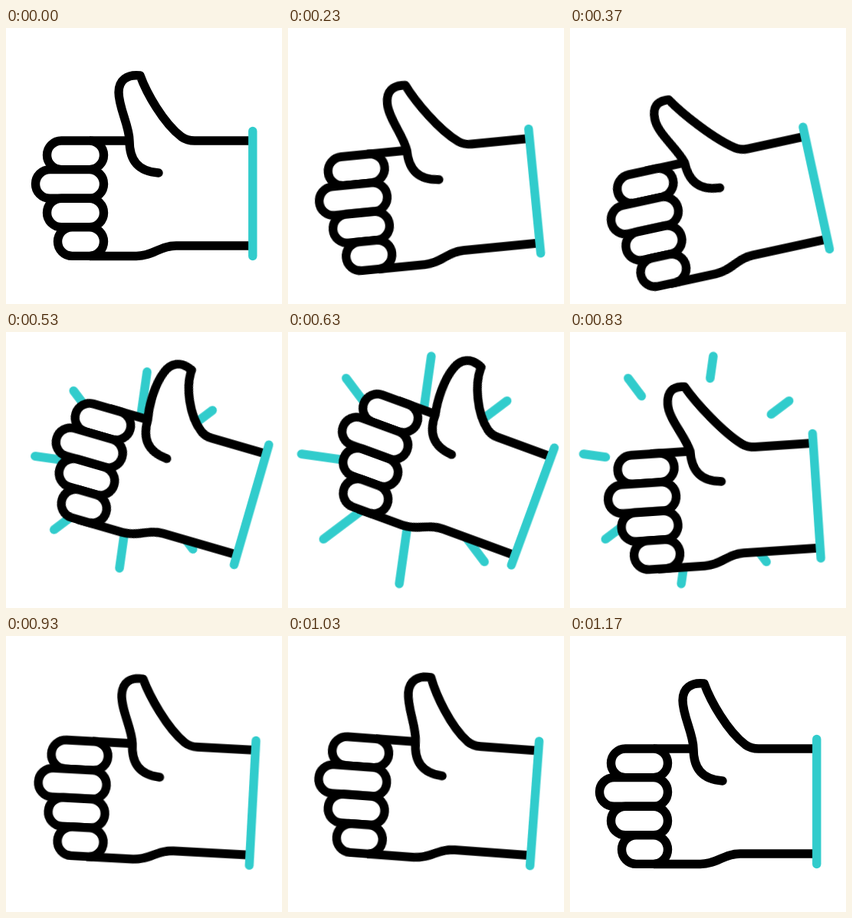
Recreate the animation shown at these times as an HTML page without scripts. Size 360 px wide and 360 px high, loop 1.67 s.

```html
<!DOCTYPE html>
<html lang="en">
<head>
<meta charset="utf-8">
<title>Thumbs up</title>
<style>
  html, body { margin: 0; width: 100%; height: 100%; overflow: hidden; background: #fff; }
  svg { display: block; width: 100vw; height: 100vh; }

  .hand, .rays line, .fingers rect, .thumb {
    animation: 1670ms infinite linear;
  }
  .ink { fill: #fff; stroke: #000; stroke-width: 11.4; stroke-linejoin: round; }
  .teal { stroke: #31cccc; stroke-width: 11.4; stroke-linecap: round; }
  .palm { stroke: none; }
  .edge { fill: none; }

  .hand { transform-origin: 288px 215px; animation-name: wave; }
  .thumb { stroke-linecap: round; animation-name: bend; animation-timing-function: ease-in-out; }
  .fingers rect { animation-name: tuck; }
  .rays line { animation-name: burst; }

  @keyframes wave {
    0%, 6.6% { transform: rotate(0deg); animation-timing-function: ease-in-out; }
    21.9% { transform: rotate(-12.3deg); animation-timing-function: cubic-bezier(.4, 0, .8, .8); }
    31.74% { transform: rotate(16deg); animation-timing-function: ease-out; }
    35.6% { transform: rotate(23deg); animation-timing-function: ease-in; }
    37.7% { transform: rotate(20.5deg); }
    41.92% { transform: rotate(2.8deg); animation-timing-function: ease-out; }
    46.7% { transform: rotate(-6deg); animation-timing-function: ease-in; }
    49.7% { transform: rotate(-3.9deg); animation-timing-function: ease-out; }
    59.3% { transform: rotate(4.7deg); animation-timing-function: ease-in-out; }
    70.06%, 100% { transform: rotate(0deg); }
  }

  /* upright, leaning back, leaning forward */
  @keyframes bend {
    0%, 6.6%, 60.5%, 100% {
      d: path("M199 189 C172 187 161 172 161 147 C161 128 147 104 147 84 C147 68 158 60 175 62 C183 84 205 124 229 142 Q236 147 246 147 L318 147");
    }
    21.9%, 47.3% {
      d: path("M199 189 C172 187 161 172 161 147 C155 126 135 103 135 84 C135 68 142 61 158 62.5 C172 85 205 125 229 142 Q236 147 246 147 L318 147");
    }
    31.74%, 36% {
      d: path("M199 189 C172 187 161 172 161 147 C157 128 157 100 164 82 C169 68 181 61 198 69 C196 92 212 127 232 142 Q238 147 248 147 L318 147");
    }
  }

  @keyframes tuck {
    0%, 12% { transform: translateX(0); }
    22.16% { transform: translateX(var(--in)); animation-timing-function: ease-out; }
    27%, 44.3% { transform: translateX(15px); animation-timing-function: ease-in-out; }
    60.5%, 100% { transform: translateX(0); }
  }

  /* dash list: start dot, gap, visible ray, rest */
  @keyframes burst {
    0%, 22.7% { stroke-dasharray: 0 0 0 400; opacity: 1; }
    31.74% { stroke-dasharray: 0 0 129 400; animation-timing-function: ease-out; }
    36.5% { stroke-dasharray: 0 0 150 400; }
    37.1% { stroke-dasharray: 0 0 150 400; animation-timing-function: cubic-bezier(.4, .2, .8, .9); }
    49.7% { stroke-dasharray: 0 120 30 400; animation-timing-function: ease-out; }
    54.5% { stroke-dasharray: 0 150 0 400; opacity: 1; }
    54.51%, 100% { stroke-dasharray: 0 150 0 400; opacity: 0; }
  }
</style>
</head>
<body>
<svg viewBox="0 0 360 360">
  <g class="rays teal" transform="translate(166 180)">
    <line x2="150" transform="rotate(53)"/>
    <line x2="150" transform="rotate(98)"/>
    <line x2="150" transform="rotate(143)"/>
    <line x2="150" transform="rotate(188)"/>
    <line x2="150" transform="rotate(233)"/>
    <line x2="150" transform="rotate(278)"/>
    <line x2="150" transform="rotate(323)"/>
  </g>
  <g class="hand">
    <path class="ink palm" d="M105 147 H318 V284 H222 C200 284 192 297.5 170 297.5 H105 Z"/>
    <path class="ink edge" d="M109 147 H161 M109 297.5 H170 C192 297.5 200 284 222 284 H318"/>
    <path class="ink thumb" d="M199 189 C172 187 161 172 161 147 C161 128 147 104 147 84 C147 68 158 60 175 62 C183 84 205 124 229 142 Q236 147 246 147 L318 147"/>
    <g class="ink fingers">
      <rect x="53.5" y="147" width="74" height="37.6" rx="18.8" style="--in:14px"/>
      <rect x="38.5" y="184.6" width="89" height="37.6" rx="18.8" style="--in:12.5px"/>
      <rect x="53.5" y="222.2" width="74" height="37.6" rx="18.8" style="--in:9px"/>
      <rect x="67.5" y="259.8" width="60" height="37.6" rx="18.8" style="--in:6.5px"/>
    </g>
    <line class="teal" x1="321.8" y1="134.5" x2="321.8" y2="297.5"/>
  </g>
</svg>
</body>
</html>
```
